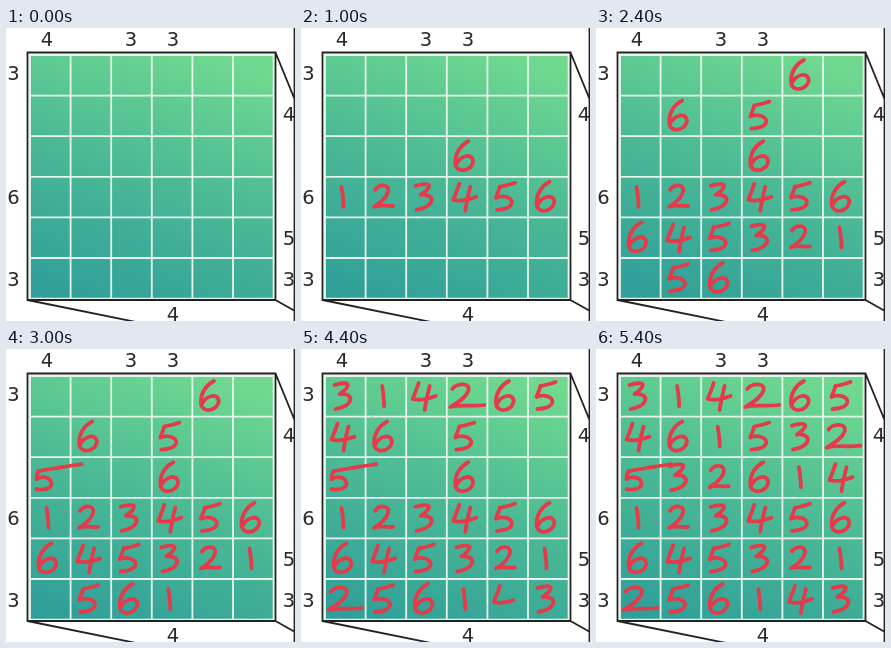
An HTML page that plays this animation: 289x293 px, repeating every 5600 ms.

```html
<!DOCTYPE html>
<html lang="en">
<head>
<meta charset="utf-8">
<style>
  html, body { margin: 0; width: 100%; height: 100%; overflow: hidden; background: #fff; }
  svg { display: block; }
  text { font: 19.5px "DejaVu Sans", sans-serif; text-anchor: middle; fill: #2a2a2a; }
  .edge { fill: none; stroke: #222; stroke-width: 1.8; }
  .grid { fill: none; stroke: #e6f5ea; stroke-width: 1.8; }
  #ink { fill: none; stroke: #e43a49; stroke-width: 3.8; stroke-linecap: round; stroke-linejoin: round; }
</style>
</head>
<body>
<svg width="289" height="293" viewBox="0 0 289 293">
  <defs>
    <linearGradient id="shade" gradientUnits="userSpaceOnUse" x1="95" y1="280" x2="190" y2="18">
      <stop offset="0" stop-color="#309f99"/>
      <stop offset=".5" stop-color="#4bb995"/>
      <stop offset="1" stop-color="#70d98f"/>
    </linearGradient>
  </defs>
  <rect x="24" y="27" width="243.5" height="243.5" fill="url(#shade)"/>
  <path class="grid" id="grid"/>
  <path class="edge" d="M21.5 24.5H269.5V272H21.5ZM269.5 24.5L288.5 71M21.5 272L130 294M269.5 272L289 283M288.5 0V293"/>
  <g id="labels"></g>
  <g id="ink"></g>
</svg>
<script>
const NS = 'http://www.w3.org/2000/svg';
const CELL = 40.6, LEFT = 24, TOP = 27;
const byId = id => document.getElementById(id);
const add = (parent, tag, attrs) => {
  const el = document.createElementNS(NS, tag);
  for (const key in attrs) el.setAttribute(key, attrs[key]);
  return parent.appendChild(el);
};

// Board lines
let lines = '';
for (let d = 0; d < 6.5 * CELL; d += CELL)
  lines += `M${LEFT + d} ${TOP}v${6 * CELL}M${LEFT} ${TOP + d}h${6 * CELL}`;
byId('grid').setAttribute('d', lines);

// Clues along one side of the board
const clues = (text, place) => [...text].forEach((n, i) => {
  const [x, y] = place(i);
  if (n !== ' ') add(byId('labels'), 'text', { x, y }).textContent = n;
});
clues('4 33', i => [41 + 42 * i, 18]);
clues('   4', i => [41 + 42 * i, 293]);
clues('3  6 3', i => [7.5, 52 + 41.2 * i]);
clues(' 4  53', i => [283, 52 + 41.2 * i]);

// Pen strokes around the middle of a cell; Z is a wide two, L a five with a long bar
const glyphs = {
  1: ['M-1 -10C0 -4 1 4 1 10'],
  2: ['M-8 -7C-4 -13 7 -13 5 -5C3 2 -4 7 -9 10C-3 7 3 10 10 9'],
  3: ['M-8 -11C-2 -13 7 -14 5 -10C4 -7 0 -4 -3 -2C5 -3 10 1 7 6C4 11 -2 12 -7 13'],
  4: ['M-5 -13C-7 -7 -9 -2 -11 3C-4 5 4 3 12 0', 'M6 -10C4 -3 2 6 1 14'],
  5: ['M-5 -10C-6 -6 -8 -2 -9 1C-3 -2 7 0 7 6C6 11 -2 13 -8 13', 'M-5 -10C0 -11 5 -12 10 -14'],
  6: ['M4 -15C-4 -11 -9 -3 -9 6C-9 15 0 16 6 11C12 4 7 -1 2 0C-3 1 -6 4 -8 8'],
  Z: ['M-12 -7C-8 -13 7 -14 4 -5C1 3 -8 7 -14 11C-4 8 8 11 20 9'],
  L: ['M-9 -6C-10 -4 -11 -1 -11 2C-6 -2 3 0 4 6C4 12 -5 13 -11 12', 'M-9 -6C8 -9 20 -11 34 -13']
};
const digits = ['314Z65', '46153Z', 'L32614', '123456', '645321', 'Z56143'];

// Each cell belongs to a round of writing; a round is filled from the bottom row up
const rounds = ['444313', '415155', '355055', '000000', '121222', '411354'];
const ends = [5, 9, 12, 18, 21.7, 27];

const marks = ends.flatMap((end, round) => {
  const cells = [];
  for (let row = 5; row >= 0; row--)
    for (let col = 0; col < 6; col++)
      if (+rounds[row][col] === round) cells.push([row, col]);
  const from = ends[round - 1] ?? 0;
  const span = (end - from) / cells.length;
  return cells.map(([row, col], i) => {
    const x = LEFT + CELL * col + 17.5, y = TOP + CELL * row + 20;
    const g = add(byId('ink'), 'g', { transform: `translate(${x} ${y})` });
    const strokes = glyphs[digits[row][col]].map(d => add(g, 'path', { d, pathLength: 1 }));
    return { strokes, span, start: from + i * span };
  });
});

function draw() {
  const step = Math.floor(performance.now() % 5600 / 200);
  for (const { strokes, start, span } of marks)
    strokes.forEach((el, i) => {
      const p = (step - start) / span * strokes.length - i;
      el.style.display = p > .01 ? '' : 'none';
      el.style.strokeDasharray = p < .99 ? `${Math.max(0, p)} 2` : 'none';
    });
  requestAnimationFrame(draw);
}
draw();
</script>
</body>
</html>
```
